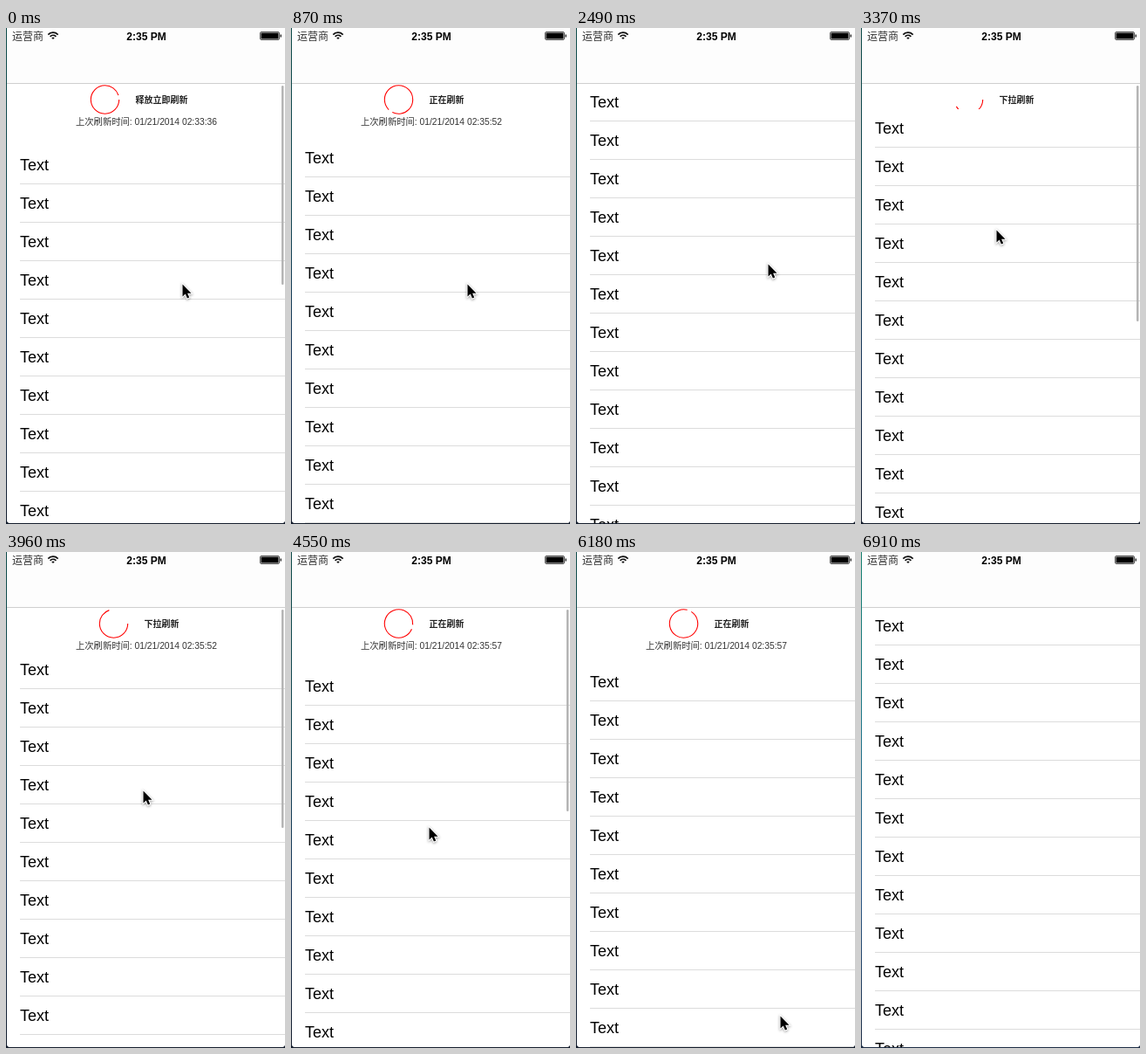
An HTML page with a canvas that plays this animation: 320x568 px, repeating every 6.95 s.

```html
<!DOCTYPE html>
<html lang="zh">
<head>
<meta charset="utf-8">
<style>
  html, body { margin: 0; width: 100%; height: 100%; overflow: hidden; background: #fff; }
  canvas { display: block; }
</style>
</head>
<body>
<canvas width="320" height="568"></canvas>
<script>
const ctx = document.querySelector('canvas').getContext('2d');
const LOOP = 6950, TICK = 147, ROW = 44, TOP = 63;
const REST = 64;            // list offset while refreshing
const REFRESH = 1715, COLLAPSE = 260, TURN = 428;
const RELEASES = [{ at: 294, peak: 72 }, { at: 4530, peak: 70 }];
const SANS = '"Liberation Sans", "Noto Sans CJK SC", "Noto Sans CJK", Arial, sans-serif';
const HAN = '"Noto Sans CJK SC", "Noto Sans CJK", sans-serif';

// time, x, y of the pointer tip
const POINTER = [
  [0, 202, 293], [2100, 202, 293], [2499, 220, 270], [2900, 155, 168],
  [3381, 155, 231], [3528, 155, 231], [4410, 158, 315], [5000, 158, 315],
  [6174, 234, 531], [6500, 236, 545], [6909, 240, 575]
];

const clamp = v => Math.max(0, Math.min(1, v));
const ease = v => v * v * (3 - 2 * v);

function pointerAt(t) {
  const i = Math.max(1, POINTER.findIndex(p => p[0] >= t));
  const [a, b] = [POINTER[i - 1], POINTER[i]];
  const k = ease(clamp((t - a[0]) / (b[0] - a[0])));
  return { x: a[1] + (b[1] - a[1]) * k, y: a[2] + (b[2] - a[2]) * k };
}

function stateAt(t) {
  const pointer = pointerAt(t);
  const release = RELEASES.filter(r => r.at <= t).pop();
  const since = release ? t - release.at : 0;
  const refreshing = !!release && since < REFRESH;
  const dragging = t > 2900 && t < RELEASES[1].at;
  let offset, bar = 0;
  if (!release) {
    offset = RELEASES[0].peak;
    bar = 1;
  } else if (refreshing) {
    offset = REST + (release.peak - REST) * Math.exp(-since / 100);
    bar = 1 - clamp((since - 250) / 250);
  } else if (dragging) {
    offset = Math.max(0, (pointer.y - 168) * 0.476);
    bar = clamp(offset);
  } else {
    offset = REST * (1 - ease(clamp((since - REFRESH) / COLLAPSE)));
  }
  return { pointer, since, refreshing, bar, offset: Math.round(offset) };
}

function text(str, x, y, font, color = '#000', align = 'left') {
  ctx.font = font;
  ctx.fillStyle = color;
  ctx.textAlign = align;
  ctx.fillText(str, x, y);
}

function rect(color, x, y, w, h) {
  ctx.fillStyle = color;
  ctx.fillRect(x, y, w, h);
}

function arc(x, y, r, from, to, width, color) {
  ctx.beginPath();
  ctx.arc(x, y, r, from, to);
  ctx.lineWidth = width;
  ctx.strokeStyle = color;
  ctx.stroke();
}

function drawHeader(t, { offset, refreshing, since }) {
  const label = refreshing ? '正在刷新' : offset >= REST ? '释放立即刷新' : '下拉刷新';
  const stamp = t < RELEASES[0].at ? '33:36' : t < RELEASES[1].at ? '35:52' : '35:57';
  const progress = refreshing ? 1 : Math.min(1, offset / 68);
  const spin = refreshing ? since / TURN * 2 * Math.PI : 0;
  const ringX = 178.5 - label.length * 5 - 35;
  arc(ringX, 82, 16.2, spin, spin + progress * 0.95 * 2 * Math.PI, 1.1, '#f00');
  text(label, 178.5, 86, 'bold 10px ' + HAN, '#222', 'center');
  text('上次刷新时间: 01/21/2014 02:' + stamp, 161, 111, '10.3px ' + SANS, '#333', 'center');
}

function drawList(offset) {
  const top = TOP + offset;
  rect('#fff', 1, top, 319, 568);
  for (let y = top; y < 568; y += ROW) {
    text('Text', 16, y + 28, '18px ' + SANS);
    rect('#dcdcdc', 16, y + 43, 304, 1);
  }
}

function drawStatusBar() {
  rect('#fdfdfd', 1, 0, 319, TOP);
  rect('#cfcfcf', 1, TOP, 319, 1);
  text('运营商', 7, 14, '12px ' + HAN, '#333');
  text('2:35 PM', 161, 14, 'bold 12px ' + SANS, '#000', 'center');
  for (const r of [1.2, 4.6, 7.8])
    arc(54, 13, r, -Math.PI * 0.76, -Math.PI * 0.24, r < 2 ? 2.4 : 1.8, '#111');
  ctx.lineWidth = 1;
  ctx.strokeStyle = '#555';
  ctx.beginPath();
  ctx.roundRect(291.5, 4.5, 22, 9, 1.5);
  ctx.stroke();
  rect('#000', 292.5, 5.5, 20, 7);
  rect('#333', 314.5, 7.5, 1.5, 3);
}

function drawPointer({ x, y }) {
  ctx.save();
  ctx.translate(Math.round(x), Math.round(y));
  const arrow = new Path2D('M.5 .5V14.5L3.7 11.6L5.9 16.6L8.2 15.6L6.1 10.7H10.5Z');
  ctx.shadowColor = 'rgba(0,0,0,.4)';
  ctx.shadowBlur = 3;
  ctx.shadowOffsetY = 1;
  ctx.lineWidth = 2;
  ctx.strokeStyle = '#fff';
  ctx.stroke(arrow);
  ctx.shadowColor = 'transparent';
  ctx.fillStyle = '#000';
  ctx.fill(arrow);
  ctx.restore();
}

function drawBackdrop(bright) {
  const g = ctx.createLinearGradient(0, 0, 0, 568);
  const colors = bright ? ['#14806f', '#1d7788', '#2b5c8c', '#1c2c44'] : ['#0c4a48', '#10454f', '#17365a', '#141d2c'];
  colors.forEach((c, i) => g.addColorStop(i / 3, c));
  rect(g, 0, 0, 320, 568);
}

function draw(t) {
  const state = stateAt(t);
  drawBackdrop(t >= 47 * TICK);
  ctx.save();
  ctx.beginPath();
  ctx.roundRect(1, -5, 319, 572, 4);
  ctx.clip();
  rect('#fff', 0, 0, 320, 568);
  drawHeader(t, state);
  drawList(state.offset);
  drawStatusBar();
  if (state.bar) {
    ctx.globalAlpha = state.bar;
    ctx.fillStyle = '#b4b4b4';
    ctx.beginPath();
    ctx.roundRect(316, 66, 2.5, 300 - state.offset, 1.25);
    ctx.fill();
  }
  ctx.restore();
  drawPointer(state.pointer);
}

function frame() {
  const t = performance.now() % LOOP;
  draw(Math.floor((t + 16) / TICK) * TICK);
  requestAnimationFrame(frame);
}
frame();
</script>
</body>
</html>
```
